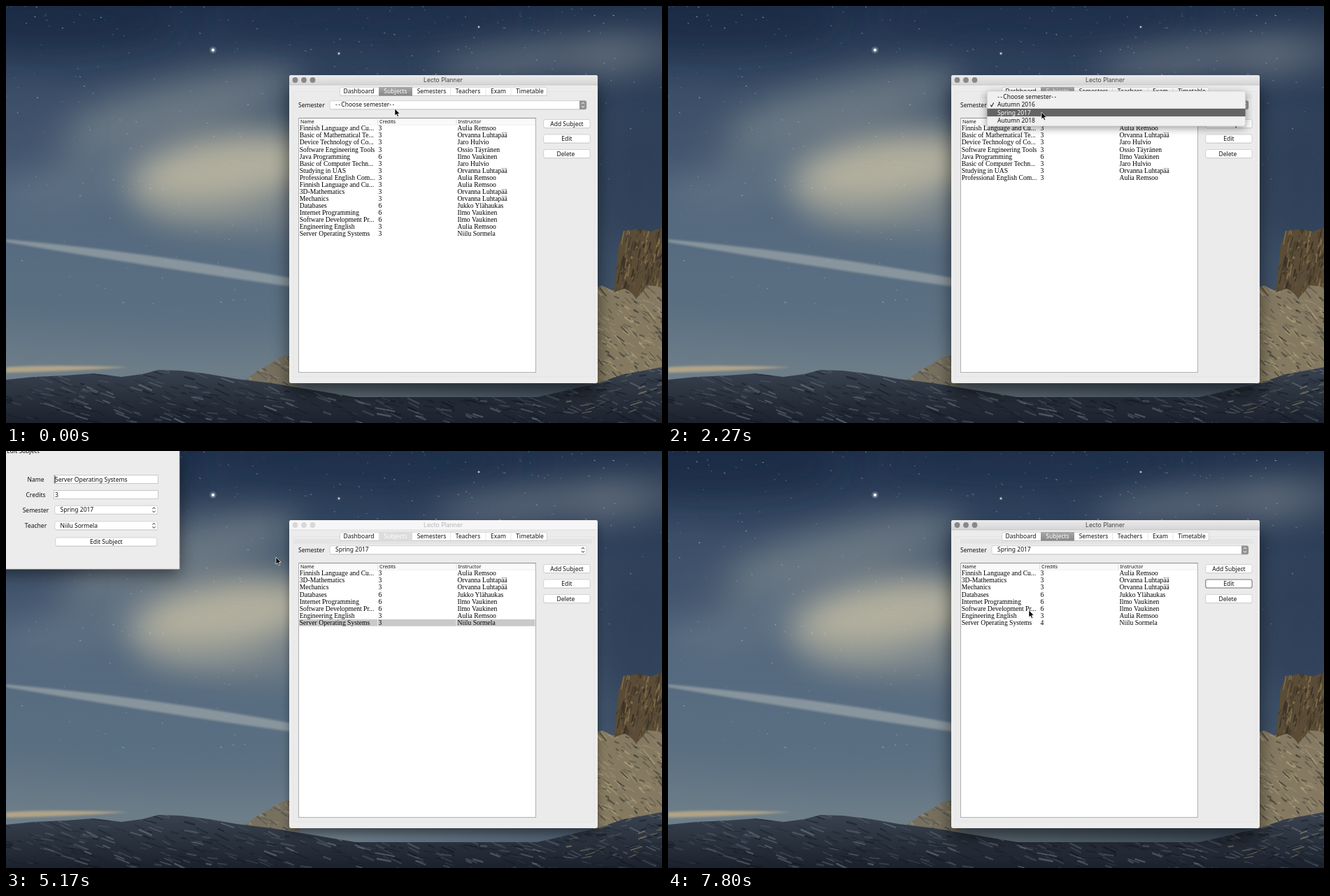
These frames come from a looping animation (938x597 px, 8 s). An HTML page:

```html
<!DOCTYPE html>
<html lang="en">
<head>
<meta charset="utf-8">
<title>Subjects</title>
<style>
html, body { margin: 0; width: 100%; height: 100%; overflow: hidden; background: #33465e; }
svg { position: absolute; left: 0; top: 0; width: 938px; height: 597px; }
text { font: 8.5px "Noto Sans", "Open Sans", sans-serif; fill: #111; white-space: pre; }
.mid { text-anchor: middle; }
.title { font: 8.6px Inter, Roboto, sans-serif; fill: #444; text-anchor: middle; }
.head { font-size: 7px; }
.cell { font: 9.65px "Liberation Serif", "Times New Roman", serif; fill: #000; }
.light, .light text { fill: #fff; }
.dim { fill: #b4b4b4; }
</style>
</head>
<body>
<svg id="stage" viewBox="0 0 938 597">
  <defs>
    <linearGradient id="sky" x2="0" y2="1">
      <stop offset="0" stop-color="#20314c"/><stop offset=".2" stop-color="#3a4d66"/>
      <stop offset=".45" stop-color="#53677d"/><stop offset=".7" stop-color="#5b7082"/>
      <stop offset=".88" stop-color="#6e7e89"/>
    </linearGradient>
    <linearGradient id="night">
      <stop offset=".45" stop-color="#24354e" stop-opacity="0"/><stop offset="1" stop-color="#24354e" stop-opacity=".6"/>
    </linearGradient>
    <linearGradient id="hill" x2="0" y2="1">
      <stop offset="0" stop-color="#3a4350"/><stop offset="1" stop-color="#1b222d"/>
    </linearGradient>
    <linearGradient id="bar" x2="0" y2="1">
      <stop offset="0" stop-color="#ebebeb"/><stop offset="1" stop-color="#d4d4d4"/>
    </linearGradient>
    <linearGradient id="tab" x2="0" y2="1">
      <stop offset="0" stop-color="#a9a9a9"/><stop offset="1" stop-color="#878787"/>
    </linearGradient>
    <linearGradient id="press" x2="0" y2="1">
      <stop offset="0" stop-color="#9a9a9a"/><stop offset=".5" stop-color="#6e6e6e"/><stop offset="1" stop-color="#7d7d7d"/>
    </linearGradient>
    <filter id="haze" x="-100%" y="-150%" width="300%" height="400%"><feGaussianBlur stdDeviation="24"/></filter>
    <filter id="soft" x="-20%" y="-100%" width="140%" height="300%"><feGaussianBlur stdDeviation="1.5"/></filter>
    <filter id="deep" x="-20%" y="-20%" width="140%" height="140%"><feGaussianBlur stdDeviation="12"/></filter>
    <filter id="low" x="-20%" y="-20%" width="140%" height="140%"><feGaussianBlur stdDeviation="6"/></filter>
  </defs>
</svg>
<script>
const LOOP = 8000;
const stage = document.getElementById('stage');
const range = n => [...Array(n).keys()];

let seed = 11;
const rnd = (a = 0, b = 1) => {
  seed = (seed * 16807) % 2147483647;
  return a + (b - a) * seed / 2147483647;
};

// ---- drawing helpers ----
const rect = (x, y, w, h, fill, more = '') =>
  `<rect x="${x}" y="${y}" width="${w}" height="${h}" fill="${fill}" ${more}/>`;
const text = (x, y, s, cls = '') => `<text x="${x}" y="${y}" class="${cls}">${s}</text>`;
const path = (d, fill, more = '') => `<path d="${d}" fill="${fill}" ${more}/>`;
const line = (d, color, w = 1, more = '') => path(d, 'none', `stroke="${color}" stroke-width="${w}" ${more}`);
const group = (body, more = '') => `<g ${more}>${body}</g>`;
const during = (times, body, more = '') => group(body, `data-on="${times}" ${more}`);

const box = (x, y, w, h, fill = '#fff', edge = '#c4c4c4') =>
  rect(x, y + .7, w, h, '#000', 'rx="2.5" opacity=".12"') +
  rect(x, y, w, h, fill, `rx="2.5" stroke="${edge}" stroke-width=".7"`);
const button = (x, y, w, h, label, cx = x + w / 2) => box(x, y, w, h) + text(cx, y + h / 2 + 3, label, 'mid');
const arrows = (x, y, color) =>
  line(`M${x - 2} ${y - 1.4}l2-2.2 2 2.2M${x - 2} ${y + 1.4}l2 2.2 2-2.2`, color, 1);

// ---- wallpaper ----
function wallpaper() {
  const clouds = [
    [310, 235, 140, 55, '#c4bea6', .85, -8], [240, 150, 190, 40, '#8e9697', .55, -15],
    [320, 295, 130, 25, '#a3a396', .5, 4], [110, 245, 110, 30, '#7c8a94', .35, -10],
    [60, 20, 190, 45, '#182740', .6, 0], [520, 15, 220, 35, '#1c2d48', .55, 0],
    [760, 74, 150, 16, '#8a9098', .75, -6], [895, 70, 80, 24, '#80878f', .5, -10],
    [900, 260, 60, 90, '#2b3b52', .6, 0], [470, 100, 60, 30, '#2c3e58', .4, 0],
    [200, 430, 260, 45, '#576d81', .5, 5], [20, 180, 80, 60, '#3c5069', .5, 0]
  ];
  const blobs = clouds.map(([x, y, rx, ry, c, o, a]) =>
    `<ellipse cx="${x}" cy="${y}" rx="${rx}" ry="${ry}" fill="${c}" opacity="${o}" transform="rotate(${a} ${x} ${y})" filter="url(#haze)"/>`).join('');
  const stars = range(330).map(() => {
    const x = rnd(0, 938), y = 430 * rnd() ** 1.5;
    return line(`M${x.toFixed(1)} ${y.toFixed(1)}l${rnd(1, 2.4).toFixed(1)} .7`, '#ccd6df', rnd(.5, 1.1).toFixed(1), `opacity="${rnd(.2, .75).toFixed(2)}"`);
  }).join('');
  const star = (x, y, r) => `<circle cx="${x}" cy="${y}" r="${r * 2.2}" fill="#b9cbe0" opacity=".3"/><circle cx="${x}" cy="${y}" r="${r}" fill="#f3f2e8"/>`;
  const streaks = (n, x0, x1, y0, y1, dx, dy, colors) => range(n).map(() => {
    const x = rnd(x0, x1), y = rnd(y0, y1), k = rnd(.4, 1.3);
    return line(`M${x.toFixed(1)} ${y.toFixed(1)}l${(dx * k).toFixed(1)} ${(dy * k * rnd(.2, 1.2)).toFixed(1)}`,
      colors[Math.floor(rnd(0, colors.length))], rnd(.7, 2.6).toFixed(1), `opacity="${rnd(.25, .7).toFixed(2)}"`);
  }).join('');
  const gold = 'M340 537L360 522L378 512L392 503L420 495V545Z';
  const slope = 'M840 405L852 400L868 408L880 395L938 385V597H840Z';
  const rock = 'M869 410L873 372L876 343L883 322L905 319L922 323L938 317V402L918 400L902 418L886 404Z';
  const ridge = 'M0 535L40 531L85 529L125 526L165 531L195 527L218 521L250 522L290 527L330 534L380 540L500 560L760 560L846 540L880 528L938 517V597H0Z';
  const clip = (id, d) => `<clipPath id="${id}"><path d="${d}"/></clipPath>`;
  return rect(0, 0, 938, 597, 'url(#sky)') + rect(0, 0, 938, 597, 'url(#night)') + blobs +
    path('M0 334Q200 352 410 390V402Q210 374 0 338Z', '#a9b0b0', 'opacity=".6" filter="url(#soft)"') +
    path('M0 517Q60 513 175 517Q90 523 0 525Z', '#c2ad88', 'opacity=".8" filter="url(#soft)"') +
    stars + star(296, 63, 2.2) + star(476, 68, 1.1) + star(676, 30, .9) +
    clip('c1', gold) + clip('c2', slope) + clip('c3', rock) + clip('c4', ridge) +
    path(gold, '#77705f') + group(streaks(50, 335, 405, 500, 540, 8, 7, ['#a39a80', '#39404a']), 'clip-path="url(#c1)"') +
    path(slope, '#857a61') +
    group(streaks(260, 840, 938, 395, 545, 9, 10, ['#b9ab84', '#393932', '#2a2d30', '#a2987c']), 'clip-path="url(#c2)"') +
    path(rock, '#5a4c36') +
    group(streaks(150, 868, 938, 316, 405, -3, 16, ['#a78d5c', '#29251f', '#362f25']), 'clip-path="url(#c3)"') +
    path(ridge, 'url(#hill)') +
    group(streaks(620, -10, 938, 518, 597, 16, 7, ['#6b7480', '#131923', '#171e29', '#515b68']) +
      streaks(60, 800, 938, 515, 585, 14, -5, ['#8a8069', '#141a22']), 'clip-path="url(#c4)"');
}

// ---- table ----
const [kp, sk, tv, vv, kl, pa, tk] = ['Aulia Remsoo', 'Orvanna Luhtapää', 'Jaro Hulvio', 'Ossio Täyränen',
  'Ilmo Vaukinen', 'Jukko Ylähaukas', 'Niilu Sormela'];
const subjects = [
  ['Finnish Language and Cu...', 3, kp], ['Basic of Mathematical Te...', 3, sk],
  ['Device Technology of Co...', 3, tv], ['Software Engineering Tools', 3, vv],
  ['Java Programming', 6, kl], ['Basic of Computer Techn...', 3, tv],
  ['Studying in UAS', 3, sk], ['Professional English Com...', 3, kp],
  ['Finnish Language and Cu...', 3, kp], ['3D-Mathematics', 3, sk],
  ['Mechanics', 3, sk], ['Databases', 6, pa],
  ['Internet Programming', 6, kl], ['Software Development Pr...', 6, kl],
  ['Engineering English', 3, kp], ['Server Operating Systems', 3, tk]
];
const row = ([name, credits, teacher], i, cls = '') => {
  const y = (178.3 + i * 10.07).toFixed(1);
  return [[419.7, name], [532.5, credits], [645.5, teacher]].map(([x, s]) => text(x, y, s, 'cell ' + cls)).join('');
};
const rows = list => list.map((s, i) => row(s, i)).join('');
const selected = fill => rect(418.5, 241, 338, 9.8, fill) + line('M531.5 241v9.8M644 241v9.8', '#fff', .7);

function table() {
  const spring = subjects.slice(8), last = spring[7];
  return rect(418.5, 160.5, 339, 364, '#fff', 'stroke="#b0b0b0"') +
    line('M419 160.5h339', '#8f8f8f') + rect(419, 161, 338, 9, '#fafafa') + line('M419 170.2h338', '#e4e4e4', .6) +
    line('M531.5 162v7.5M644 162v7.5M757 162v7.5', '#d0d0d0', .7) +
    text(421, 168, 'Name', 'head') + text(534, 168, 'Credits', 'head') + text(646.5, 168, 'Instructor', 'head') +
    during('0 1290', rows(subjects)) +
    during('1290 2980', rows(subjects.slice(0, 8))) +
    during('2980 8000',
      rows(spring.slice(0, 7)) +
      during('0 4100', row(last, 7)) +
      during('4100 4990', selected('#0f55d5') + row(last, 7, 'light')) +
      during('4990 7570', selected('#c9c9c9') + row(last, 7)) +
      during('7570 8000', row([last[0], 4, last[2]], 7)));
}

// ---- main window ----
const ACTIVE = '0 4990 7570 8000', INACTIVE = '4990 7570';
const dash = '<tspan letter-spacing="1.4">--</tspan>';
const choices = [dash + 'Choose semester' + dash, 'Autumn 2016', 'Spring 2017', 'Autumn 2018'];

function mainWindow() {
  const shadow = (dy, filter, o) => rect(405, 99 + dy, 441, 441, '#000', `rx="4" opacity="${o}" filter="url(#${filter})"`);
  const lights = fill => [413.5, 426, 438.5].map(x => `<circle cx="${x}" cy="106" r="3.9" fill="${fill}"/>`).join('');
  const top = 'M405 113V102Q405 99 408 99H843Q846 99 846 102V113Z';
  const strip = (x, w) => rect(x, 126, w, 7, '#e4e4e4');
  const tabs = [['Dashboard', 504.5], ['Semesters', 608.5], ['Teachers', 660.5], ['Exam', 704], ['Timetable', 749]];
  return during(ACTIVE, shadow(16, 'deep', .55)) + during(INACTIVE, shadow(8, 'low', .38)) +
    rect(405, 99, 441, 441, '#ececec', 'rx="3"') +
    during(ACTIVE, path(top, 'url(#bar)') + line('M405 113h441', '#bdbdbd', .7) + lights('#87878a') + text(625, 109, 'Lecto Planner', 'title')) +
    during(INACTIVE, path(top, '#f6f6f6') + line('M405 113h441', '#d6d6d6', .7) + lights('#d8d8d8') + text(625, 109, 'Lecto Planner', 'title dim')) +
    rect(411, 122.5, 430, 408.5, '#ebebeb', 'stroke="#e3e3e3" stroke-width=".7"') +
    during('1200 4990', strip(447, 388)) + during('4990 7570', strip(411, 427)) + during('7570 8000', strip(418, 420)) +
    box(477.5, 116.3, 296, 12) + line('M635.5 117v11M686 117v11M722 117v11', '#d8d8d8', .7) +
    during(ACTIVE, rect(533, 116, 48, 12.6, 'url(#tab)')) + during(INACTIVE, rect(533, 116, 48, 12.6, '#dcdcdc')) +
    text(557, 125, 'Subjects', 'mid light') + tabs.map(([s, x]) => text(x, 125, s, 'mid')).join('') +
    text(418, 145, 'Semester', 'label') +
    box(463, 135.7, 367, 12) +
    during(ACTIVE, path('M820 135.5h7.5q2.5 0 2.5 2.5v7.5q0 2.5-2.5 2.5h-7.5z', '#929292') + arrows(825, 141.7, '#fff')) +
    during(INACTIVE, arrows(825, 141.7, '#222')) +
    during('0 1290', text(471, 144.4, choices[0])) +
    during('1290 2980', text(471, 144.4, choices[1])) +
    during('2980 8000', text(471, 144.4, choices[2])) +
    table() +
    button(768.7, 162.5, 66.5, 12, 'Add Subject') +
    button(768.7, 184, 66.5, 12, 'Edit') +
    button(768.7, 205.5, 66.5, 12, 'Delete', 800.5) +
    during('4840 4930', box(768.7, 183.6, 66.5, 12.6, 'url(#press)', '#777') + text(802, 193, 'Edit', 'mid')) +
    during('7570 8000', rect(768.7, 184, 66.5, 12, 'none', 'rx="2.5" stroke="#888" stroke-width="1.2"'));
}

// The checked item always opens over the field.
function popup(checked, open, close, marks) {
  const top = 133.2 - checked * 11.3;
  const mid = i => top + 8 + i * 11.3;
  const item = (i, cls = '') => text(471, (mid(i) + 3).toFixed(1), choices[i], cls);
  return during(`${open} ${close}`,
    rect(456, top + 3, 370, 50, '#000', 'rx="3" opacity=".4" filter="url(#low)"') +
    rect(456.3, top, 369.4, 50, '#f0f0f0', 'rx="2.5" stroke="#c8c8c8" stroke-width=".6"') +
    range(4).map(i => item(i)).join('') +
    line(`M461 ${mid(checked) + .3}l1.7 2.4 3-5.4`, '#222', 1.1) +
    marks.map(([i, from, to]) => during(`${from} ${to}`,
      rect(456.3, mid(i) - 5.6, 369.4, 11.2, '#646464') + item(i, 'light') +
      (i === checked ? line(`M461 ${mid(i) + .3}l1.7 2.4 3-5.4`, '#fff', 1.1) : ''))).join(''));
}

// ---- edit dialog ----
function dialog() {
  const field = (y, s) => rect(68.5, y, 149, 11.8, '#fff', 'stroke="#bdbdbd" stroke-width=".8"') + s;
  const combo = (y, s) => box(69.8, y, 147, 12) + text(77.5, y + 8.8, s) + arrows(211.5, y + 6, '#222');
  const caret = y => rect(75, y, 1, 11, '#000');
  const labels = [['Name', 44], ['Credits', 65.6], ['Semester', 87.6], ['Teacher', 110]];
  return during('4990 7570',
    rect(-20, 6, 268, 170, '#000', 'opacity=".5" filter="url(#deep)"') +
    rect(-5, -5, 253, 174, '#ececec', 'stroke="#c9c9c9" stroke-width=".7"') +
    text(1, 3, 'Edit Subject') +
    labels.map(([s, y]) => text(42.5, y, s, 'mid')).join('') +
    field(34.7, text(70, 43.8, 'Server Operating Systems')) +
    during('4990 5600', rect(69.5, 35.5, 1, 10.5, '#000')) +
    field(56.5, during('5850 6680', rect(69.5, 57, 5.8, 11, '#a0c8fa')) +
      during('0 6680', text(70, 65.6, '3')) + during('6680 8000', text(70, 65.6, '4')) +
      during('6680 6860', caret(57))) +
    combo(78.3, 'Spring 2017') + combo(100.8, tk) +
    button(70.8, 124, 145, 12, 'Edit Subject') +
    during('7450 7570', box(70.8, 124, 145, 12, 'url(#press)', '#777') + text(143.3, 133, 'Edit Subject', 'mid')));
}

const pointer = group(path('M0 0V10L2.3 8L3.9 11.6L5.6 10.9L4.1 7.3H7.2Z', '#000', 'stroke="#fff" stroke-width=".7"'), 'id="pointer"');

stage.insertAdjacentHTML('beforeend', wallpaper() + mainWindow() +
  popup(0, 240, 1230, [[0, 240, 760], [1, 760, 1170]]) +
  popup(1, 1580, 2930, [[1, 1580, 2040], [2, 2040, 2870]]) +
  dialog() + pointer);

// ---- timing: build keyframes from on/off times and pointer stops ----
const pct = ms => (ms / LOOP * 100).toFixed(3) + '%';
const rules = {};
for (const el of stage.querySelectorAll('[data-on]')) {
  const key = 'on-' + el.dataset.on.replace(/ /g, '-');
  rules[key] = `@keyframes ${key}{0%{opacity:0}` +
    el.dataset.on.split(' ').map((t, i) => `${pct(t)}{opacity:${1 - i % 2}}`).join('') + '}';
  el.style.animation = `${key} ${LOOP}ms step-end infinite`;
}

const stops = [
  [0, 556, 147], [59, 556, 147], [60, 555.5, 146], [590, 555.5, 146], [760, 546, 148], [940, 535, 152],
  [1230, 535, 152], [1400, 537, 142], [1640, 537, 142], [2270, 534, 152],
  [3580, 534, 152], [3980, 509, 244], [4110, 509, 244], [4370, 750, 224], [4430, 757, 219], [4660, 799, 190],
  [5169, 799, 190], [5170, 386, 152], [5320, 386, 152], [5600, 100, 64], [5700, 80, 62], [5900, 7, 66],
  [6080, 57, 72], [6140, 92, 100], [6560, 132, 130], [7569, 132, 130], [7800, 516, 228], [8000, 516, 228]
];
const moves = stops.map(([t, x, y]) => `${pct(t)}{transform:translate(${x}px,${y}px)}`).join('');
const sheet = document.createElement('style');
sheet.textContent = Object.values(rules).join('\n') +
  `\n@keyframes move{${moves}}\n#pointer{animation:move ${LOOP}ms linear infinite}`;
document.head.append(sheet);
</script>
</body>
</html>
```
